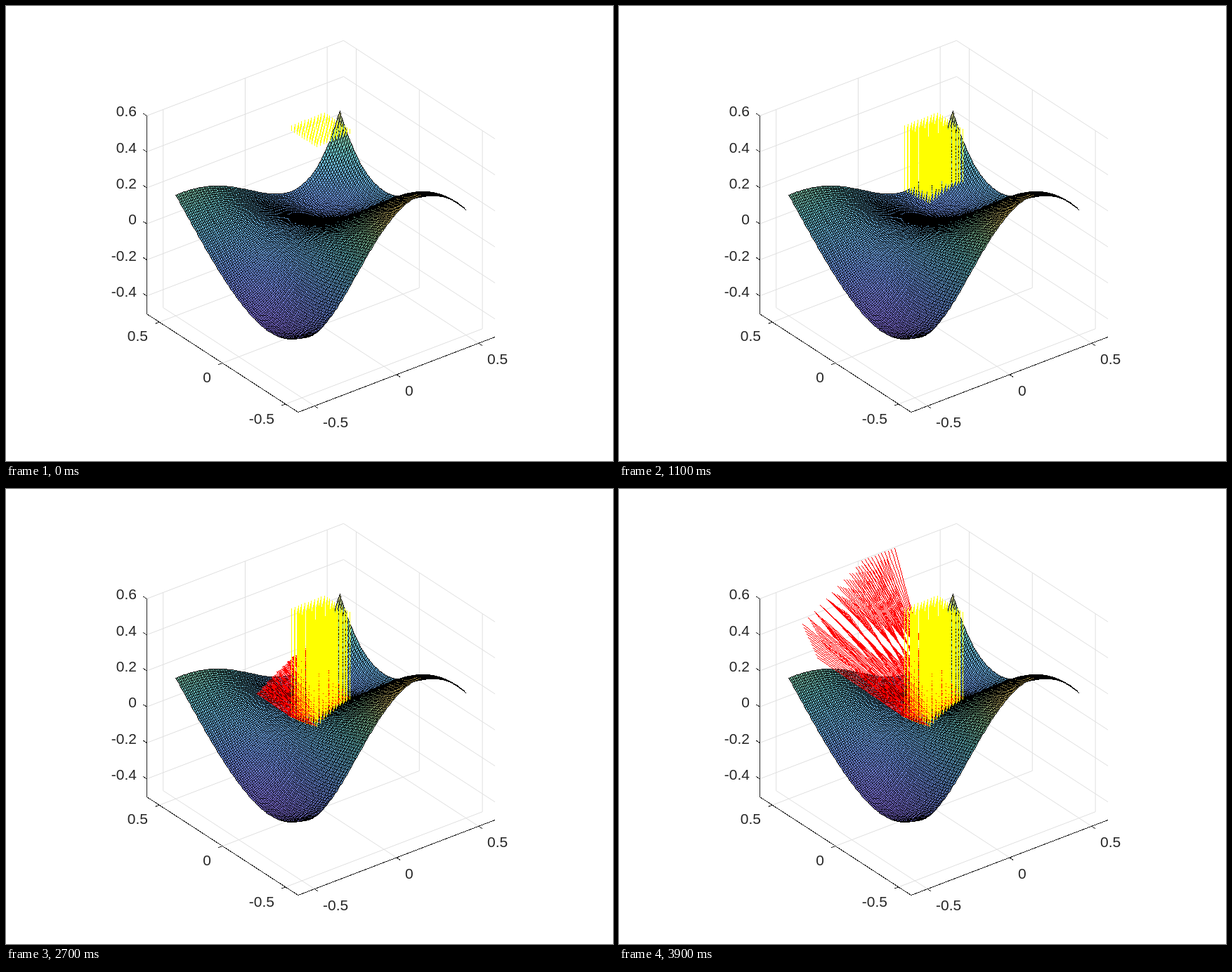
These frames come from a looping animation (864x648 px, 4 s). An HTML page with a canvas:

```html
<!DOCTYPE html>
<html lang="en">
<head>
<meta charset="utf-8">
<title>Ray reflection on a curved surface</title>
<style>
html, body { margin: 0; width: 864px; height: 648px; overflow: hidden; background: #fff; }
svg, canvas { position: absolute; left: 0; top: 0; }
text { font: 21px "Liberation Sans", Arial, sans-serif; fill: #262626; }
.grid { stroke: #dfdfdf; }
.axis { stroke: #262626; shape-rendering: crispEdges; }
</style>
</head>
<body>
<svg id="axes" width="864" height="648"></svg>
<canvas id="plot" width="864" height="648"></canvas>
<script>
const W = 864, H = 648, N = 100, RAYS = 11, STEPS = 20;
const svg = document.getElementById('axes');
const ctx = document.getElementById('plot').getContext('2d');

// Orthographic view: azimuth -37.5, elevation 30
const project = (x, y, z) => [
  447.7 + 233.5 * x - 179.6 * y,
  326.2 - 89.3 * x - 116.7 * y - 256.5 * z
];
const depth = (x, y, z) => -0.527 * x - 0.687 * y + 0.5 * z;
const mix = (a, b, t) => a + (b - a) * t;

// ---- axes ----
function add(tag, attrs, txt) {
  const el = document.createElementNS('http://www.w3.org/2000/svg', tag);
  for (const k in attrs) el.setAttribute(k, attrs[k]);
  if (txt) el.textContent = txt;
  svg.appendChild(el);
}
function line(cls, [x1, y1], [x2, y2]) {
  add('line', { class: cls, x1: x1 + 0.5, y1: y1 + 0.5, x2: x2 + 0.5, y2: y2 + 0.5 });
}
const label = (txt, x, y, anchor) => add('text', { x, y: y + 7.5, 'text-anchor': anchor }, txt);
const tick = ([x, y], dx, dy) => line('axis', [x, y], [x + dx, y + dy]);

function drawAxes() {
  const E = 0.6, B = -0.5, T = 0.6;
  const zs = [-0.4, -0.2, 0, 0.2, 0.4, 0.6], xs = [-0.5, 0, 0.5];
  for (const z of zs) {
    line('grid', project(-E, E, z), project(E, E, z));
    line('grid', project(E, E, z), project(E, -E, z));
  }
  for (const v of xs) {
    line('grid', project(v, E, B), project(v, E, T));
    line('grid', project(E, v, B), project(E, v, T));
    line('grid', project(v, E, B), project(v, -E, B));
    line('grid', project(E, v, B), project(-E, v, B));
  }
  line('axis', project(-E, E, B), project(-E, E, T));
  line('axis', project(-E, E, B), project(-E, -E, B));
  line('axis', project(-E, -E, B), project(E, -E, B));
  zs.forEach(z => {
    const p = project(-E, E, z);
    tick(p, -5, -3.3);
    label(String(z), 186, p[1] - 6, 'end');
  });
  xs.forEach((v, i) => {
    tick(project(v, -E, B), 5, 3.3);
    tick(project(-E, v, B), -5.6, 2.1);
    label(String(v), 451 + 117 * i, 592 - 44.7 * i, 'start');
    label(String(v), 382 - 90 * i, 587 - 59 * i, 'end');
  });
}

// ---- surface: blend of four edge curves plus a central bump ----
const poly = (c, t) => c.reduceRight((s, k) => s * t + k, 0);
const WEST = [-0.188, 0.48, 0.76, -0.6];
const EAST = [0.04, -0.4, 0.81, 1.98];
const SOUTH = [0.262, 0.955, -1.694, -2.39, 2.84];
const NORTH = [0.015, -0.53, 0.343, 2.59, 2.09];
const SW = -0.163, SE = 0.195, NW = 0.17, NE = 0.29;

function height(x, y) {
  const u = x + 0.5, v = y + 0.5;
  const acrossX = mix(poly(WEST, y), poly(EAST, y), u);
  const acrossY = mix(poly(SOUTH, x), poly(NORTH, x), v);
  const corners = mix(mix(SW, SE, u), mix(NW, NE, u), v);
  return acrossX + acrossY - corners + 0.1 * (1 - 4 * x * x) * (1 - 4 * y * y);
}

const RAMP = [
  [-0.25, 128, 108, 215], [-0.1, 112, 148, 230], [0, 108, 178, 225],
  [0.1, 108, 195, 200], [0.2, 135, 195, 150], [0.28, 185, 175, 105], [0.37, 225, 190, 90]
];
const rgb = (r, g, b) => (255 << 24 | b << 16 | g << 8 | r) >>> 0;
function shade(z) {
  let i = 1;
  while (i < RAMP.length - 1 && z > RAMP[i][0]) i++;
  const a = RAMP[i - 1], b = RAMP[i];
  const t = Math.max(0, Math.min(1, (z - a[0]) / (b[0] - a[0])));
  return rgb(mix(a[1], b[1], t), mix(a[2], b[2], t), mix(a[3], b[3], t));
}

// ---- hard-edged pixel drawing ----
const image = ctx.createImageData(W, H);
const px = new Uint32Array(image.data.buffer);
const BLACK = rgb(0, 0, 0), YELLOW = rgb(255, 255, 0), RED = rgb(255, 0, 0);

function stroke([x0, y0], [x1, y1], col) {
  x0 = Math.round(x0); y0 = Math.round(y0);
  const dx = Math.round(x1) - x0, dy = Math.round(y1) - y0;
  const n = Math.max(Math.abs(dx), Math.abs(dy)) || 1;
  for (let i = 0; i <= n; i++)
    px[Math.round(y0 + dy * i / n) * W + Math.round(x0 + dx * i / n)] = col;
}

function triangle(a, b, c, col) {
  const side = (p, q, x, y) => (q[0] - p[0]) * (y - p[1]) - (q[1] - p[1]) * (x - p[0]);
  const xs = [a[0], b[0], c[0]], ys = [a[1], b[1], c[1]];
  for (let y = Math.min(...ys); y <= Math.max(...ys); y++)
    for (let x = Math.min(...xs); x <= Math.max(...xs); x++) {
      const s = side(a, b, x, y), t = side(b, c, x, y), u = side(c, a, x, y);
      if ((s >= 0 && t >= 0 && u >= 0) || (s <= 0 && t <= 0 && u <= 0)) px[y * W + x] = col;
    }
}

function drawSurface() {
  const at = k => k / N - 0.5;
  const grid = [];
  for (let j = 0; j <= N; j++) {
    grid.push([]);
    for (let i = 0; i <= N; i++) {
      const x = at(i), y = at(j);
      grid[j].push(project(x, y, height(x, y)).map(Math.round));
    }
  }
  // far cells first
  for (let j = N - 1; j >= 0; j--)
    for (let i = N - 1; i >= 0; i--) {
      const a = grid[j][i], b = grid[j][i + 1], c = grid[j + 1][i + 1], d = grid[j + 1][i];
      const col = shade(height(at(i + 0.5), at(j + 0.5)));
      triangle(a, b, c, col);
      triangle(a, c, d, col);
      stroke(a, b, BLACK);
      stroke(b, c, BLACK);
      stroke(c, d, BLACK);
      stroke(d, a, BLACK);
    }
}

// ---- rays: 20 steps down to the surface, 20 steps along the reflection ----
function makeRays() {
  const segs = [];
  const tip = (s, t) => [
    mix(mix(261, 345, s), mix(282, 392, s), t),
    mix(mix(192, 102, s), mix(240, 84, s), t)
  ];
  for (let i = 0; i < RAYS; i++)
    for (let j = 0; j < RAYS; j++) {
      const s = i / (RAYS - 1), t = j / (RAYS - 1);
      const x = mix(-0.1, 0.1, s), y = mix(-0.1, 0.1, t), z = height(x, y);
      const hit = project(x, y, z), end = tip(s, t);
      const down = k => project(x, y, mix(0.6, z, k / STEPS));
      const out = k => [mix(hit[0], end[0], k / STEPS), mix(hit[1], end[1], k / STEPS)];
      for (let k = 0; k < STEPS; k++) {
        const mid = mix(0.6, z, (k + 0.5) / STEPS);
        segs.push({ a: down(k), b: down(k + 1), step: k, col: YELLOW, depth: depth(x, y, mid) });
        segs.push({ a: out(k), b: out(k + 1), step: STEPS + k, col: RED, depth: depth(x, y, z) });
      }
    }
  return segs.sort((p, q) => p.depth - q.depth);
}

drawAxes();
drawSurface();
const base = px.slice();
const rays = makeRays();
let shown = -1;

function render(ms) {
  const step = Math.floor(ms % 4000 / 100);
  if (step === shown) return;
  shown = step;
  px.set(base);
  for (const r of rays) if (r.step <= step) stroke(r.a, r.b, r.col);
  ctx.putImageData(image, 0, 0);
}

const start = performance.now();
function loop() {
  render(performance.now() - start);
  requestAnimationFrame(loop);
}
loop();
</script>
</body>
</html>
```
